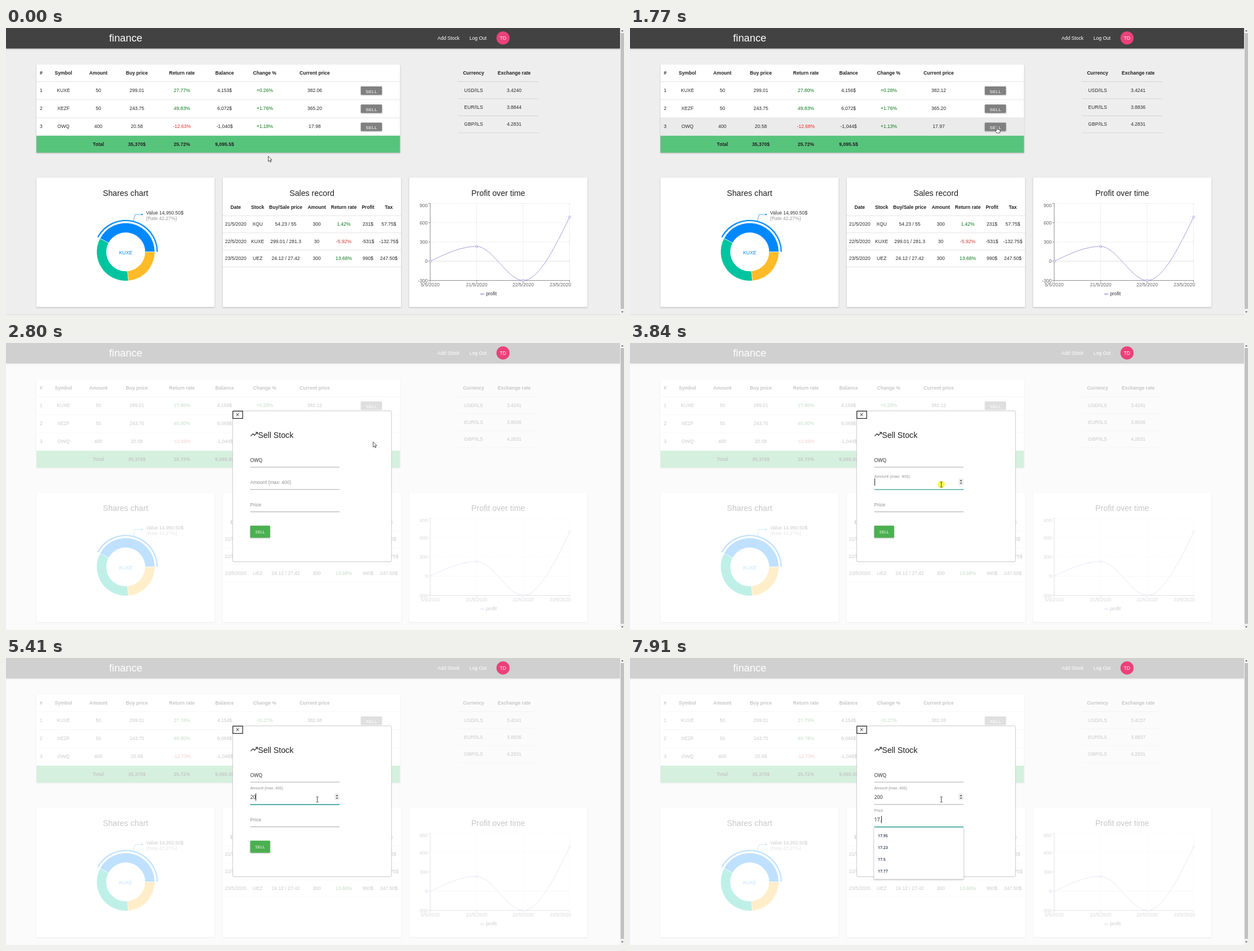
These frames come from a looping animation (1097 by 511 pixels, 8000 ms). An HTML page:

```html
<!DOCTYPE html>
<html lang="en">
<head>
<meta charset="utf-8">
<title>Finance dashboard</title>
<style>
  html, body { margin: 0; width: 100%; height: 100%; overflow: hidden; background: #eee; }
  svg { display: block; width: 100%; height: 100%; font-family: "Liberation Sans", Arial, sans-serif; }
  text { white-space: pre; }
  .system { font-family: "Open Sans", sans-serif; }
  .raised { filter: drop-shadow(0 1px 1px rgba(0, 0, 0, .25)); }
</style>
</head>
<body>
<svg id="stage" viewBox="0 0 1097 511"></svg>
<script>
const LOOP = 8000, FONT = 8.57;
const OPEN = 2800, FOCUS_AMOUNT = 3760, FOCUS_PRICE = 5720;
const INK = '#2b2b2b', GREEN = '#0b7a1a', RED = '#dd3529', TEAL = '#26a69a';
const stage = document.getElementById('stage');
const liveTexts = [];

function add(tag, attrs, parent = stage) {
  const el = document.createElementNS('http://www.w3.org/2000/svg', tag);
  for (const name in attrs) el.setAttribute(name, attrs[name]);
  return parent.appendChild(el);
}
const group = (parent, attrs = {}) => add('g', attrs, parent);
const rect = (x, y, width, height, fill, parent, extra) =>
  add('rect', { x, y, width, height, fill, ...extra }, parent);
const path = (d, stroke, width, parent, extra) =>
  add('path', { d, stroke, 'stroke-width': width, fill: 'none', ...extra }, parent);
const show = (el, on) => el.setAttribute('visibility', on ? 'visible' : 'hidden');

// y is the middle of the capitals; value is a string or [first, time, next, time, next ...]
function text(x, y, value, parent, { size = FONT, fill = INK, anchor = 'middle', ...extra } = {}) {
  const el = add('text', { x, y: y + size * .36, 'font-size': size, fill, 'text-anchor': anchor, ...extra }, parent);
  if (Array.isArray(value)) liveTexts.push({ el, value });
  else el.textContent = value;
  return el;
}
function valueAt(steps, t) {
  let current = steps[0];
  for (let i = 1; i < steps.length; i += 2) if (t >= steps[i]) current = steps[i + 1];
  return current;
}
const bold = { 'font-weight': 700, fill: '#212121' };
function row(columns, y, cells, parent, style) {
  cells.forEach((cell, i) => {
    const first = String(Array.isArray(cell) ? cell[0] : cell);
    const fill = !first.endsWith('%') ? INK : first[0] === '-' ? RED : GREEN;
    if (first) text(columns[i], y, cell, parent, style || { fill });
  });
}
const rule = (x1, x2, y, parent) => path(`M${x1} ${y}H${x2}`, '#dcdcdc', .8, parent);

// Page
const page = group();
rect(0, 0, 1090, 511, '#eee', page);
rect(0, 0, 1090, 36.5, '#424242', page, { class: 'raised' });
text(183, 17.8, 'finance', page, { size: 18.3, fill: '#fff', anchor: 'start' });
text(785.5, 17.7, 'Add Stock', page, { fill: '#fff' });
text(838, 17.7, 'Log Out', page, { fill: '#fff' });

// Stocks
const stockCols = [62.5, 102, 164, 232.3, 312.3, 388, 459.3, 548];
rect(54, 65, 645.5, 157, '#fff', page, { class: 'raised' });
const hoverRow = rect(54, 160, 645.5, 31.5, '#ebebeb', page);
rect(54, 191.7, 645.5, 30.3, '#57c47c', page);
row(stockCols, 80, ['#', 'Symbol', 'Amount', 'Buy price', 'Return rate', 'Balance', 'Change %', 'Current price'], page, bold);
[
  ['1', 'KUXE', '50', '299.01',
    ['27.77%', 1540, '27.80%', 5010, '27.78%', 7750, '27.79%'], ['4,153$', 1540, '4,156$', 5010, '4,154$'],
    ['+0.26%', 1540, '+0.28%', 5010, '+0.27%'], ['382.06', 1540, '382.12', 5010, '382.08', 7750, '382.09']],
  ['2', 'XEZF', '50', '243.75',
    ['49.83%', 2400, '49.80%', 7910, '49.78%'], ['6,072$', 2400, '6,069$', 7910, '6,066$'],
    ['+1.76%', 2400, '+1.74%'], ['365.20', 2400, '365.13']],
  ['3', 'OWQ', '400', '20.58',
    ['-12.63%', 1540, '-12.68%', 5010, '-12.73%'], ['-1,040$', 1540, '-1,044$', 5010, '-1,048$'],
    ['+1.18%', 1540, '+1.13%'], ['17.98', 1540, '17.97']]
].forEach((cells, i) => {
  const y = 111 + i * 32.2;
  rule(54, 699.5, y - 15.5, page);
  row(stockCols, y, cells, page);
  rect(629.8, y - 7, 37.6, 15, '#808080', page, { rx: 1, class: 'raised' });
  text(648.7, y + 1.7, 'SELL', page, { size: 8, fill: '#fff', 'letter-spacing': .25 });
});
row(stockCols, 207, ['', '', 'Total', '35,370$', '25.72%', '9,095.5$'], page, bold);

// Currencies
const rateCols = [830, 902];
row(rateCols, 80, ['Currency', 'Exchange rate'], page, bold);
[
  ['USD/ILS', ['3.4240', 820, '3.4241', 5880, '3.4237']],
  ['EUR/ILS', ['3.8844', 820, '3.8836', 5880, '3.8837']],
  ['GBP/ILS', '4.2831']
].forEach((cells, i) => row(rateCols, 110.5 + i * 30.4, cells, page));
for (let i = 0; i < 4; i++) path(`M802 ${95.5 + i * 30.4}H946`, '#d0d0d0', .8, page);

// Cards
['Shares chart', 'Sales record', 'Profit over time'].forEach((title, i) => {
  const x = 54 + i * 330.8;
  rect(x, 266.3, 316.4, 230.5, '#fff', page, { class: 'raised' });
  text(x + 158.2, 294.2, title, page, { size: 14.2, fill: '#212121' });
});

// Donut
const CX = 212.5, CY = 398.7;
const polar = (r, deg) => {
  const a = deg * Math.PI / 180;
  return `${CX + r * Math.cos(a)} ${CY - r * Math.sin(a)}`;
};
function sector(inner, outer, from, to, fill) {
  const large = to - from > 180 ? 1 : 0;
  add('path', {
    d: `M${polar(outer, from)}A${outer} ${outer} 0 ${large} 0 ${polar(outer, to)}` +
       `L${polar(inner, to)}A${inner} ${inner} 0 ${large} 1 ${polar(inner, from)}Z`,
    fill, stroke: '#fff', 'stroke-width': .6
  }, page);
}
const BLUE = '#0088fe', share = 152.2;
sector(34.3, 51.6, 0, share, BLUE);
sector(34.3, 51.6, share, 275.5, '#00c49f');
sector(34.3, 51.6, 275.5, 360, '#ffbb28');
sector(54.6, 57.4, 0, share, BLUE);
path(`M${polar(57.1, share / 2)}L${polar(68.6, share / 2)}h12.6`, BLUE, .7, page);
add('circle', { cx: 241.6, cy: 332, r: 1.3, fill: BLUE }, page);
text(248.4, 329, 'Value 14,950.50$', page, { fill: '#333', anchor: 'start' });
text(248.4, 339.3, '(Rate 42.27%)', page, { fill: '#999', anchor: 'start' });
text(CX, 400.3, 'KUXE', page, { fill: BLUE });

// Sales
const saleCols = [407.8, 446.6, 496.6, 551.6, 599.6, 642.6, 679.5];
row(saleCols, 319, ['Date', 'Stock', 'Buy/Sale price', 'Amount', 'Return rate', 'Profit', 'Tax'], page, bold);
[
  ['21/5/2020', 'XQU', '54.23 / 55', '300', '1.42%', '231$', '57.75$'],
  ['22/5/2020', 'KUXE', '299.01 / 281.3', '30', '-5.92%', '-531$', '-132.75$'],
  ['23/5/2020', 'UEZ', '24.12 / 27.42', '300', '13.68%', '990$', '247.50$']
].forEach((cells, i) => row(saleCols, 349.3 + i * 30.5, cells, page));
for (let i = 0; i < 4; i++) rule(385, 701, 334.2 + i * 30.5, page);

// Profit chart
const X0 = 753, STEP = 82.5, AXIS = '#666';
const chartY = v => 312.5 + (900 - v) * 137 / 1200;
[900, 600, 300, 0, -300].forEach(v => {
  const y = chartY(v);
  path(`M${X0} ${y}h${3 * STEP}`, '#ccc', .6, page, v ? { 'stroke-dasharray': '1.7 1.7' } : {});
  path(`M${X0} ${y}h-3.4`, AXIS, .7, page);
  text(748.5, v === 900 ? 316 : y, String(v), page, { fill: AXIS, anchor: 'end' });
});
['5/5/2020', '21/5/2020', '22/5/2020', '23/5/2020'].forEach((date, i) => {
  const x = X0 + i * STEP;
  path(`M${x} 312.5V449.5`, '#ccc', .6, page, { 'stroke-dasharray': '1.7 1.7' });
  path(`M${x} 449.5v3.4`, AXIS, .7, page);
  text(i === 3 ? 984 : x, 457.3, date, page, { fill: AXIS });
});
path(`M${X0} 312.5V449.5h${3 * STEP}`, AXIS, .7, page);
const LINE = '#8884d8', profits = [0, 231, -300, 690].map(chartY);
const [p0, p1, p2, p3] = profits, third = STEP / 3;
path(`M${X0} ${p0}c${third} ${(p1 - p0) / 2} ${2 * third} ${p1 - p0} ${STEP} ${p1 - p0}` +
     `c${third} 0 ${2 * third} ${p2 - p1} ${STEP} ${p2 - p1}` +
     `c${third} 0 ${2 * third} ${(p3 - p2) / 2} ${STEP} ${p3 - p2}`, LINE, .8, page);
const dot = (cx, cy, r) =>
  add('circle', { cx, cy, r, fill: '#fff', stroke: LINE, 'stroke-width': .8 }, page);
profits.forEach((y, i) => dot(X0 + i * STEP, y, 1.8));
path('M841.5 473.7h8', LINE, 1, page);
dot(845.5, 473.7, 1.4);
text(852, 473, 'profit', page, { fill: '#333', anchor: 'start' });
rect(0, 510, 1090, 1, '#ddd', page);

const veil = rect(0, 0, 1090, 511, '#fff', stage, { opacity: .75 });
add('circle', { cx: 882.3, cy: 17.7, r: 11.7, fill: '#ec407a' });
text(882.3, 17.7, 'TD', stage, { fill: '#fff' });

// Scrollbar
rect(1090, 0, 7, 511, '#f1f1f1');
rect(1091, 9, 6, 491, '#c1c1c1');
add('path', { d: 'M1092 6h4l-2-2.5zM1092 504.5h4l-2 2.5z', fill: '#505050' });

// Dialog
const dialog = group();
rect(402.3, 120.8, 282, 268.7, '#fff', dialog, { stroke: '#c8c8c8', 'stroke-width': 1, rx: 2 });
rect(402.7, 121.4, 17.4, 13, '#fafafa', dialog, { stroke: '#222', 'stroke-width': 1.2 });
path('M408.7 125.1l4.8 4.8m0-4.8l-4.8 4.8', '#222', 1, dialog);
path('M434.4 165.8l4-4.1 2.6 2.6 5-5M442.8 159h3.6v3.6', '#222', 1.2, dialog);
text(447.2, 164.2, 'Sell Stock', dialog, { size: 14.2, fill: '#212121', anchor: 'start' });

const input = (y, value = '') =>
  text(433.5, y, value, dialog, { size: 8.8, anchor: 'start', class: 'system', fill: '#222' });
function field(y, label) {
  path(`M433.5 ${y + 12.6}H592`, '#9e9e9e', .9, dialog);
  const focusLine = path(`M433.5 ${y + 12.8}H592`, TEAL, 1.5, dialog);
  const labelEl = text(0, 0, label, dialog, { fill: '#929292', anchor: 'start' });
  return {
    y, value: input(y),
    update(lift, focus) {
      labelEl.setAttribute('transform', `translate(433.5 ${y - .2 - 16.6 * lift}) scale(${1 - .2 * lift})`);
      focusLine.setAttribute('opacity', focus);
    }
  };
}
input(208.5, 'OWQ');
path('M433.5 221H592', '#9e9e9e', .9, dialog);
rect(433.5, 325.2, 35.3, 21.5, '#4caf50', dialog, { rx: 1.2, class: 'raised' });
text(451.2, 336, 'SELL', dialog, { size: 8, fill: '#fff', class: 'system' });
const amount = field(248.2, 'Amount (max: 400)');
const price = field(288, 'Price');
const spinner = group(dialog);
rect(583, 241.3, 9, 11.8, '#ededed', spinner);
add('path', { d: 'M585.5 245.9h4l-2-2.4zM585.5 248.7h4l-2 2.4z', fill: '#444' }, spinner);
const caret = rect(434, 241, 1, 13, '#222', dialog);

// Suggestions
const ITEM = 20.7;
const suggestions = group(dialog);
const listBox = rect(433, 302, 159.2, 92, '#fff', suggestions,
  { class: 'raised', stroke: '#ccc', 'stroke-width': .5, rx: 1 });
const items = ['17.95', '17.23', '17.5', '17.77', '17', '18.2'].map((label, i) =>
  text(440, 317 + i * ITEM, label, suggestions,
    { size: 6.9, anchor: 'start', fill: '#1d2d4d', class: 'system', 'font-weight': 600 }));

// Pointer
const halo = add('circle', { r: 6.3, fill: '#fff000', opacity: .68 });
const outline = { fill: '#fff', 'stroke-linejoin': 'round' };
const arrow = path('M0 0V9.4L2.2 7.4 3.7 10.6 5.1 10 3.7 6.8H6.6Z', '#222', .8, stage, outline);
const hand = path('M-1 1Q0-.8 1 1V5L5 5.8Q6 6 5.8 7.5L5 11.5H-.2L-3 7.6Q-3 6-1 7.2Z', '#222', .8, stage, outline);
const beam = path('M-2-4.8Q0-4.8 0-4Q0-4.8 2-4.8M0-4V4M-2 4.8Q0 4.8 0 4Q0 4.8 2 4.8', '#333', .9);

const clamp = v => Math.max(0, Math.min(1, v));
const mix = (a, b, p) => a + (b - a) * p;
const easeOut = (p, power) => 1 - (1 - p) ** power;
const smooth = p => p * p * (3 - 2 * p);
const stepped = (t, start, interval, count) => clamp((Math.floor((t - start) / interval) + 1) / count);

function pointerAt(t) {
  if (t < OPEN) {
    const p = stepped(t, 1060, 79, 10);
    return [mix(465.5, 651.3, easeOut(p, 2.35)), mix(228.3, 175.5, easeOut(p, 1.15))];
  }
  const p = smooth(stepped(t, 3040, 80, 9));
  return [mix(651.7, 552.6, p), mix(176, 252, p)];
}
const keyTimes = [FOCUS_AMOUNT, 4930, 5410, 5560, FOCUS_PRICE, 6900, 6970, 7670];
const between = (t, from, to) => t >= from && t < to;
const transition = (t, start) => easeOut(clamp((t - start) / 200), 2);

function render(t) {
  liveTexts.forEach(({ el, value }) => { el.textContent = valueAt(value, t); });
  const open = t >= OPEN;
  const [x, y] = pointerAt(t);
  const inField = open && x < 592 && y > 238;
  const onButton = !open && x > 630 && y < 184;
  show(hoverRow, !open && y < 191.5);
  show(veil, open);
  dialog.style.display = open ? '' : 'none';

  const amountFocus = transition(t, FOCUS_AMOUNT), priceFocus = transition(t, FOCUS_PRICE);
  amount.update(amountFocus, amountFocus * (1 - priceFocus));
  price.update(priceFocus, priceFocus);
  amount.value.textContent = valueAt(['', 4930, '2', 5410, '20', 5560, '200'], t);
  price.value.textContent = valueAt(['', 6900, '1', 6970, '17', 7670, '17.'], t);
  spinner.style.display = inField ? '' : 'none';

  const active = t < FOCUS_PRICE ? amount : price;
  const lastKey = keyTimes.filter(k => k <= t).pop();
  const typed = active.value.textContent;
  const length = typed.length - (typed.includes('.') ? .5 : 0);
  caret.setAttribute('x', Math.floor(434.1 + 4.9 * length));
  caret.setAttribute('y', active === amount ? 241 : 281);
  caret.style.display = lastKey && Math.floor((t - lastKey) / 550) % 2 === 0 ? '' : 'none';

  const count = valueAt([0, 6900, 6, 6970, 5, 7670, 4], t);
  suggestions.style.display = count ? '' : 'none';
  listBox.setAttribute('height', count * ITEM + 9);
  items.forEach((item, i) => { item.style.display = i < count ? '' : 'none'; });

  [arrow, hand, beam].forEach(el => el.setAttribute('transform', `translate(${x} ${y})`));
  show(hand, onButton);
  show(beam, inField);
  show(arrow, !onButton && !inField);
  halo.setAttribute('cx', x);
  halo.setAttribute('cy', y);
  show(halo, between(t, 2640, OPEN) || between(t, FOCUS_AMOUNT, 3920));
}

function frame() {
  render(performance.now() % LOOP);
  requestAnimationFrame(frame);
}
frame();
</script>
</body>
</html>
```
